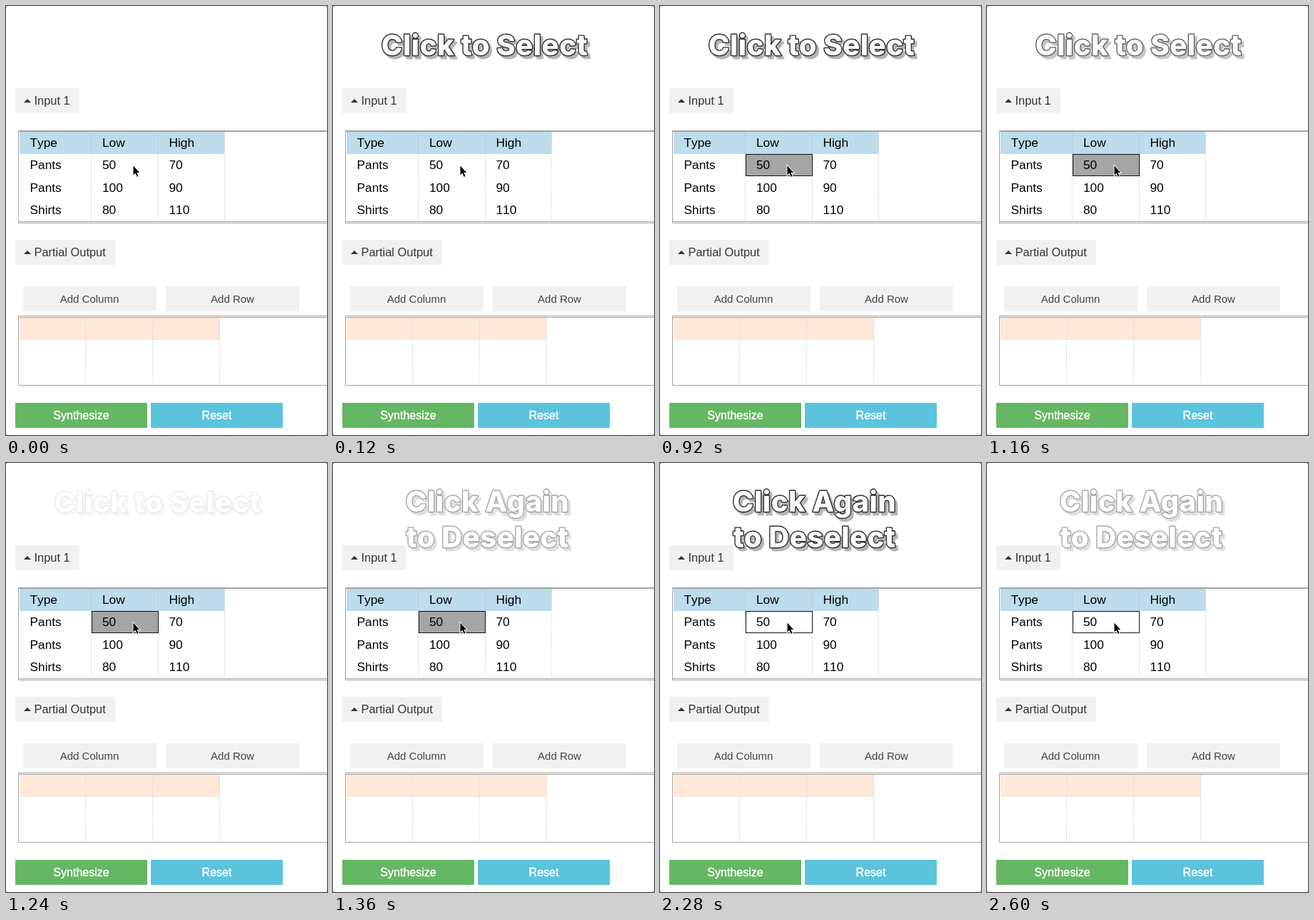
An HTML page that plays this animation: 450x600 px, repeating every 2640 ms.

```html
<!DOCTYPE html>
<html lang="en">
<head>
<meta charset="utf-8">
<title>Click to select</title>
<style>
  html, body { margin: 0; width: 100%; height: 100%; overflow: hidden; background: #fff; }
  svg { display: block; width: 450px; height: 600px; font-family: "Liberation Sans", Arial, sans-serif; font-kerning: none; }

  .panel { fill: #f1f1f1; }
  .label { font-size: 16.4px; fill: #333; }
  .action { font-size: 15px; fill: #444; text-anchor: middle; }
  .submit { font-size: 16px; fill: #fff; stroke: #fff; stroke-width: .4px; text-anchor: middle; }
  .cells { font-size: 17.3px; fill: #000; }
  .frame { fill: none; stroke: #a2a2a2; }
  .grid { fill: none; stroke: #dedede; stroke-dasharray: 3 1; }

  .title {
    font: 800 40px Inter, Lato, sans-serif;
    text-anchor: middle;
    fill: #fff;
    stroke: #333;
    stroke-width: 2.8px;
    stroke-linejoin: round;
    paint-order: stroke;
    letter-spacing: .5px;
  }
  .shadow { fill: #b4b4b4; stroke: #b4b4b4; }

  .select, .deselect, .focus, .picked {
    opacity: 0;
    animation: 2640ms step-end infinite;
  }
  .select { animation-name: select; }
  .deselect { animation-name: deselect; }
  .focus { animation-name: focus; }
  .picked { animation-name: picked; }

  @keyframes select {
    0% { opacity: 0; }
    1.5% { opacity: .33; }
    3% { opacity: .67; }
    4.5% { opacity: 1; }
    43.9% { opacity: .75; }
    45.4% { opacity: .4; }
    46.9% { opacity: .1; }
    48.4%, 100% { opacity: 0; }
  }
  @keyframes deselect {
    0% { opacity: 0; }
    49.9% { opacity: .1; }
    51.5% { opacity: .42; }
    53% { opacity: .75; }
    54.5% { opacity: 1; }
    98.4%, 100% { opacity: .42; }
  }
  @keyframes focus {
    0% { opacity: 0; }
    7.5%, 100% { opacity: 1; }
  }
  @keyframes picked {
    0% { opacity: 0; }
    10.6% { opacity: 1; }
    81.8%, 100% { opacity: 0; }
  }
</style>
</head>
<body>
<svg viewBox="0 0 450 600">
  <defs>
    <g id="select-text">
      <text x="212.5" y="69">Click to Select</text>
    </g>
    <g id="deselect-text">
      <text x="216.5" y="68">Click Again</text>
      <text x="216.5" y="118">to Deselect</text>
    </g>
    <path id="caret" d="M0 5L5 0L10 5Z" fill="#333"/>
  </defs>

  <!-- Window corners -->
  <path d="M0 0H2L0 2ZM450 0H448L450 2ZM0 600H2L0 598ZM450 600H448L450 598Z" fill="#999"/>

  <!-- Section headings -->
  <rect class="panel" x="13" y="115" width="90" height="35"/>
  <rect class="panel" x="13" y="327" width="140" height="35"/>
  <use href="#caret" x="25" y="130"/>
  <use href="#caret" x="25" y="342"/>
  <g class="label">
    <text x="39.5" y="138">Input 1</text>
    <text x="39.5" y="350">Partial Output</text>
  </g>

  <!-- Input table -->
  <rect x="19" y="176" width="288" height="31" fill="#bddcec"/>
  <path class="grid" d="M119.5 207V301M213.5 207V301M306.5 176V301"/>
  <path class="grid" d="M119.5 176V207M213.5 176V207" style="stroke:#aecbd9"/>
  <path class="frame" d="M451 174.5H17.5V303.5H451M18 301.5H451"/>
  <path class="frame" d="M18 175.5H451"/>
  <rect class="picked" x="120" y="207" width="94" height="31" fill="#a5a5a5"/>
  <rect class="focus" x="120.5" y="207.5" width="93" height="30" fill="none" stroke="#111"/>
  <g class="cells">
    <text y="197"><tspan x="33.5">Type</tspan><tspan x="135">Low</tspan><tspan x="228.5">High</tspan></text>
    <text y="228"><tspan x="33.5">Pants</tspan><tspan x="135">50</tspan><tspan x="228.5">70</tspan></text>
    <text y="260"><tspan x="33.5">Pants</tspan><tspan x="135">100</tspan><tspan x="228.5">90</tspan></text>
    <text y="291"><tspan x="33.5">Shirts</tspan><tspan x="135">80</tspan><tspan x="228.5">110</tspan></text>
  </g>

  <!-- Output table -->
  <rect class="panel" x="24" y="392" width="187" height="35"/>
  <rect class="panel" x="224" y="392" width="187" height="35"/>
  <g class="action">
    <text x="117" y="415">Add Column</text>
    <text x="317.5" y="415">Add Row</text>
  </g>
  <rect x="19" y="436" width="281" height="31" fill="#fde8d9"/>
  <path class="grid" d="M111.5 436V529M205.5 436V529M299.5 436V529"/>
  <path class="frame" d="M451 433.5H17.5V530.5H451M18 435.5H451"/>

  <!-- Bottom buttons -->
  <rect x="13" y="555" width="185" height="35" fill="#66b764"/>
  <rect x="203" y="555" width="185" height="35" fill="#5cc3dd"/>
  <g class="submit">
    <text x="105.5" y="578">Synthesize</text>
    <text x="295.5" y="578">Reset</text>
  </g>

  <!-- Titles -->
  <g class="title">
    <g class="select">
      <use class="shadow" href="#select-text" x="3.5" y="3.5"/>
      <use href="#select-text"/>
    </g>
    <g class="deselect">
      <use class="shadow" href="#deselect-text" x="3.5" y="3.5"/>
      <use href="#deselect-text"/>
    </g>
  </g>

  <!-- Pointer -->
  <path d="M178.5 223.5V236.5L181.4 233.8L183.6 238.8L185.6 238L183.4 233H187.2Z"
        fill="#000" stroke="#fff" stroke-width="1.8" paint-order="stroke"/>
</svg>
</body>
</html>
```
